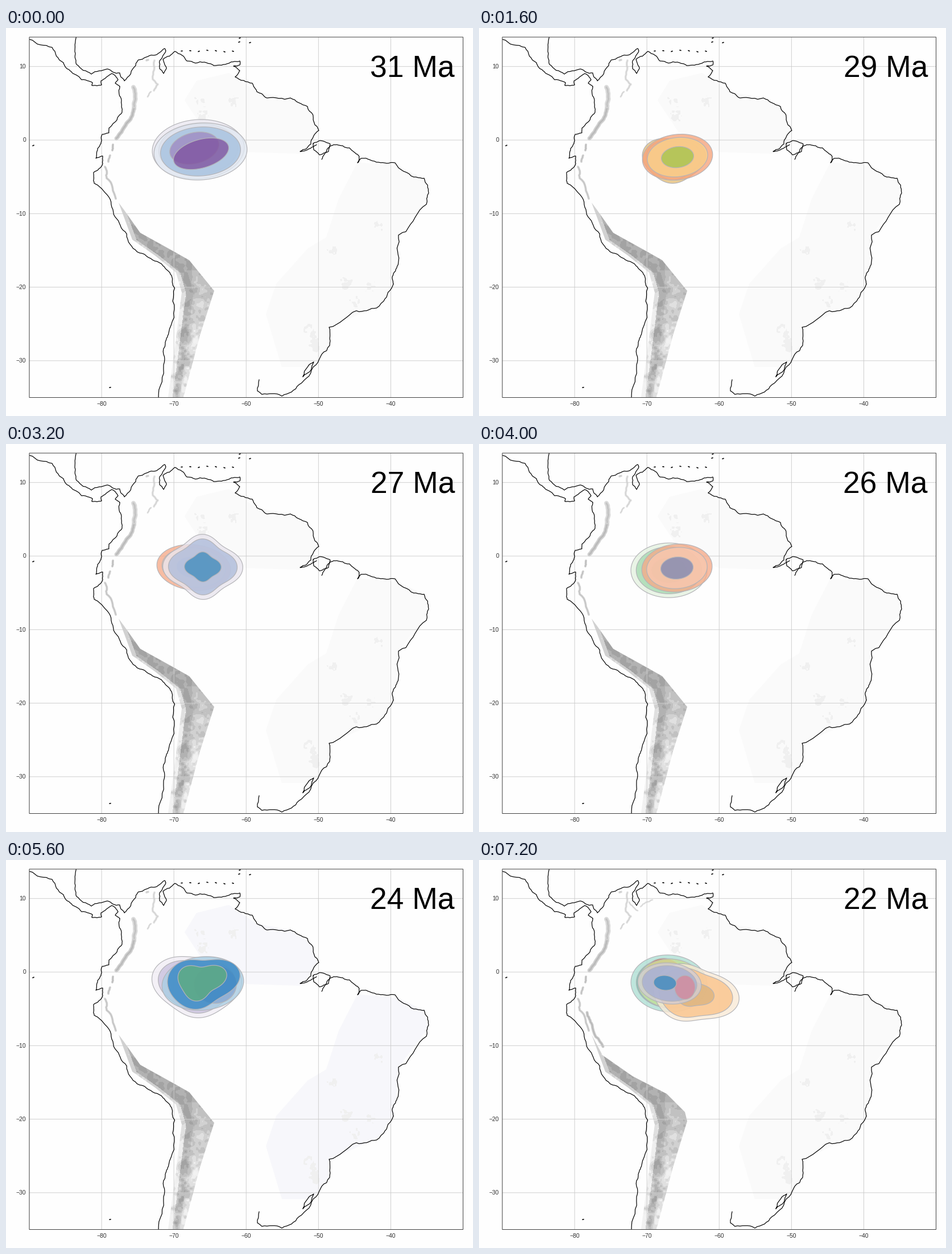
Animation of 821x682 px, one loop 8000 ms. Source, as a matplotlib script:

```python
import numpy as np
import matplotlib.pyplot as plt
from matplotlib.animation import FuncAnimation
from matplotlib.colors import to_rgb
from matplotlib.patches import Polygon, Rectangle

W, H, DPI = 821, 682, 64
PT = 72 / DPI                        # points per pixel
X0, X1, Y0, Y1 = 41, 803.5, 16, 649.5
START_AGE, STEPS = 31, 10

rng = np.random.default_rng(7)
fig = plt.figure(figsize=(W / DPI, H / DPI), dpi=DPI, facecolor="#fefefe")
ax = fig.add_axes([0, 0, 1, 1])
ax.axis("off")
frame = Rectangle((X0, Y0), X1 - X0, Y1 - Y0, fc="none", ec="#404040",
                  lw=PT, zorder=9, snap=False)
ax.add_patch(frame)


# --- helpers -------------------------------------------------------------
def pts(*v):
    return np.array(v, float).reshape(-1, 2)


def lon_x(lon):
    return X0 + (lon + 90) * (X1 - X0) / 60


def lat_y(lat):
    return Y0 + (14 - lat) * (Y1 - Y0) / 49


def rough(p, amount=0.11, rounds=3):
    """Split every segment and push the new points sideways."""
    for _ in range(rounds):
        d = np.diff(p, axis=0)
        side = np.column_stack([-d[:, 1], d[:, 0]])
        mid = p[:-1] + d / 2 + side * rng.uniform(-amount, amount, (len(d), 1))
        out = np.empty((2 * len(p) - 1, 2))
        out[::2], out[1::2] = p, mid
        p = out
    return p


def noise(w, h, cell):
    """Smooth random field between 0 and 1."""
    g = rng.random((h // cell + 3, w // cell + 3))
    x, y = np.arange(w) / cell, np.arange(h)[:, None] / cell
    ix, iy = x.astype(int), y.astype(int)
    fx, fy = x - ix, y - iy
    fx, fy = fx * fx * (3 - 2 * fx), fy * fy * (3 - 2 * fy)
    top = g[iy, ix] * (1 - fx) + g[iy, ix + 1] * fx
    low = g[iy + 1, ix] * (1 - fx) + g[iy + 1, ix + 1] * fx
    return top * (1 - fy) + low * fy


def line(p, width=1.2, color="black", z=5, snap=None):
    ln, = ax.plot(p[:, 0], p[:, 1], color=color, lw=width * PT, zorder=z,
                  solid_capstyle="round", solid_joinstyle="round", snap=snap)
    ln.set_clip_path(frame)
    return ln


def area(p, color, z):
    return ax.add_patch(Polygon(p, fc=color, ec="none", zorder=z))


def picture(img, x, y, clip, z):
    h, w = img.shape[:2]
    im = ax.imshow(img, extent=(x, x + w, y + h, y), interpolation="nearest",
                   aspect="auto", zorder=z)
    im.set_clip_path(clip)
    return im


# --- old shields -----------------------------------------------------------
GUIANA = pts(335, 93, 392, 79, 440, 112, 500, 123, 535, 146, 548, 181, 518, 221,
             422, 218, 350, 182, 314, 127)
BRAZIL = pts(618, 236, 690, 243, 735, 264, 742, 295, 692, 362, 681, 450,
             655, 488, 568, 527, 569, 558, 540, 596, 485, 596, 457, 503,
             475, 450, 530, 388, 563, 368, 585, 300)
HILLS = pts(338, 128, 346, 156, 402, 127, 572, 390, 653, 348, 598, 448,
            612, 482, 640, 455, 532, 530, 545, 558)

shields = [area(p, "#fafafa", 1) for p in (GUIANA, BRAZIL)]
gx, gy = np.meshgrid(np.arange(300, 760), np.arange(70, 610))
near = sum(np.exp(-((gx - x) ** 2 + (gy - y) ** 2) / 260) for x, y in HILLS)
bumps = np.minimum(near, 1) * (noise(460, 540, 11) + noise(460, 540, 4)) / 2
spots = np.full(bumps.shape + (4,), 0.945)
spots[..., 3] = bumps > 0.46
for s in shields:
    picture(spots, 300, 70, s, 2)

# --- mountains ---------------------------------------------------------------
WEST = pts(285, 649, 295, 575, 309, 465, 299, 430, 262, 400, 222, 372, 198, 307)
EAST = pts(207, 319, 236, 360, 290, 390, 322, 408, 366, 462, 341, 540, 312, 649)
EAST_LATE = pts(206, 322, 217, 343, 270, 380, 330, 411, 362, 443, 366, 459,
                341, 540, 312, 649)

w, h = 190, 350
gx, gy = np.meshgrid(np.arange(190, 190 + w), np.arange(302, 302 + h))
inland = gx - np.interp(gy, WEST[::-1, 1], WEST[::-1, 0])
grain = (noise(w, h, 13) + noise(w, h, 5)) / 2 - 0.5
south = np.clip((gy - 400) / 200, 0, 1)
streak = np.exp(-((inland - 14) / 10) ** 2)
tone = 0.69 + 0.18 * south - 0.12 * streak * south + 0.16 * (inland < 7)
tone += 0.05 * (gy > 425) * (inland > 20) + (0.08 + 0.3 * south) * grain
tone = np.clip(np.round(tone / 0.06) * 0.06 - 0.02, 0.62, 0.95)
texture = np.repeat(tone[..., None], 3, axis=2)


def andes(east):
    return picture(texture, 190, 302, area(np.vstack([WEST, east]), "none", 2), 3)


def ridge(width, shade, *v):
    """Pale hill range with a darker crest."""
    p = rough(pts(*v), 0.12)
    return [line(p, width, str(shade), 3),
            line(p, width * 0.4, str(shade - 0.09), 3)]


ridge(8, 0.86, 224, 104, 227, 122, 225, 142)
ridge(7, 0.82, 225, 142, 219, 160, 203, 183, 194, 194)
ridge(4, 0.82, 188, 205, 187, 215)
ridge(4, 0.84, 183, 224, 180, 235)
ridge(4, 0.85, 174, 244, 177, 264, 193, 300)
ridge(4, 0.91, 261, 57, 258, 90, 267, 99, 260, 110)
ridge(3, 0.90, 255, 112, 249, 121)
ridge(4, 0.88, 247, 57, 250, 56)
line(pts(200, 324, 207, 339, 215, 352), 2, "#fefefe", 3)

early = [andes(EAST)]
late = [andes(EAST_LATE),
        *ridge(5, 0.81, 190, 268, 199, 290, 218, 328),
        *ridge(3, 0.91, 264, 74, 279, 89),
        *ridge(3, 0.92, 284, 82, 305, 70)]

# --- graticule and labels ------------------------------------------------------
TICK = dict(family="Liberation Sans", size=10.4 * PT, color="#303030")
for lon in range(-80, -30, 10):
    x = lon_x(lon)
    line(pts(x, Y0, x, Y1), 0.9, "#cbcbcb", 4, snap=False)
    ax.text(x, 660.5, f"\u2212{-lon}", ha="center", va="center", **TICK)
for lat in range(10, -40, -10):
    y = lat_y(lat)
    line(pts(X0, y, X1, y), 0.9, "#cbcbcb", 4, snap=False)
    ax.text(35, y + 0.5, str(lat).replace("-", "\u2212"), ha="right",
            va="center", **TICK)

# --- coasts: key points, roughened ---------------------------------------------
ISTHMUS = pts(41, 20, 81, 34, 101, 61, 104, 68, 118, 80, 133, 91, 152, 96,
              151, 101, 168, 100, 167, 93, 186, 80, 197, 91, 192, 97, 200, 103)
PACIFIC = pts(200, 103, 203, 128, 204, 148, 194, 163, 181, 176, 181, 184,
              169, 187, 167, 203, 161, 212, 158, 229, 170, 225, 170, 238,
              154, 254, 155, 273, 168, 282, 186, 315, 201, 347, 218, 380,
              247, 401, 276, 418, 291, 435, 293, 480, 286, 536, 280, 555,
              277, 592, 268, 651)
CARIBBEAN = pts(124, 14, 122, 45, 124, 64, 150, 81, 178, 72, 200, 79, 208, 93,
                228, 66, 233, 56, 259, 48, 279, 36, 281, 40, 270, 58, 270, 71,
                277, 80, 282, 70, 276, 55, 297, 41, 318, 58, 349, 60, 365, 66,
                392, 62, 411, 58, 411, 65, 400, 67, 411, 75, 403, 86)
GUIANAS = pts(403, 86, 433, 97, 441, 112, 459, 123, 500, 123, 530, 138, 543, 170,
              550, 180, 536, 204, 517, 217, 534, 212, 546, 205)
DELTA = pts(540, 203, 553, 198, 570, 204, 567, 217, 551, 223, 541, 214, 540, 203)
BULGE = pts(555, 231, 560, 222, 571, 207, 592, 207, 613, 219, 621, 226, 618, 237,
            625, 229, 655, 236, 684, 237, 717, 262, 735, 264, 743, 290, 739, 310,
            703, 358, 690, 364, 690, 410, 681, 432, 681, 450)
SOUTH = pts(681, 450, 664, 480, 652, 492, 616, 497, 568, 526, 569, 558, 545, 592,
            515, 627, 485, 647, 450, 644, 442, 638, 445, 618)
LAGOON = pts(522, 613, 530, 596, 541, 587, 537, 600, 522, 613)
for coast in (ISTHMUS, PACIFIC, CARIBBEAN, GUIANAS, DELTA, BULGE, SOUTH, LAGOON):
    line(rough(coast))

antilles = [(x, 41 + rng.uniform(-3, 3)) for x in np.linspace(308, 398, 7)]
for x, y in antilles + [(47, 207), (182, 632), (410, 18), (409, 25), (428, 26)]:
    line(pts(x, y, x + 2, y + rng.uniform(-1, 1)), 1.7)


# --- density contours ----------------------------------------------------------
LEVELS = (1, 0.86, 0.46)
ALPHA = 0.78


def cloud(colors, cx, cy, rx, ry, tilt=0, lobes=0, amp=0, turn=0):
    """Nested lobed ellipses; colours are those seen over white."""
    a = np.linspace(0, 2 * np.pi, 160, endpoint=False)
    tilted = a - np.radians(tilt)
    r = 1 / np.hypot(np.cos(tilted) / rx, np.sin(tilted) / ry)
    r *= 1 + amp * np.cos(lobes * (a - np.radians(turn)))
    ring = np.column_stack([r * np.cos(a), r * np.sin(a)])
    patches = []
    for color, size in zip(colors.split(), LEVELS):
        ink = 1 - (1 - np.array(to_rgb(color))) / ALPHA
        patches.append(ax.add_patch(Polygon(
            ring * size + (cx, cy), fc=(*np.clip(ink, 0, 1), ALPHA),
            ec="#b4b4b8", lw=1.2 * PT, zorder=6)))
    return patches


LILAC = "#f2f0f6 #d5d0e6 #a29bcd"
BLUE = "#eeebf2 #c0cbe3 #6ca6cb"
GREEN = "#eaf5e7 #b9e2c2 #90c9a0"
PEACH = "#f8bda2 #fad5c2 #9aa2c4"
SUN = "#f9b797 #fbdca5 #b8d274"

ages = {
    31: [cloud("#efedf4 #ddd3e4", 338, 213, 81, 52, -4),
         cloud("#e8eef5 #b9cfe6", 342, 217, 82, 50, -4),
         cloud("#b3a4cf", 331, 211, 44, 27, -14),
         cloud("#9b78b4", 343, 221, 50, 25, -16)],
    30: [cloud(GREEN, 338, 226, 70, 56),
         cloud(SUN, 348, 217, 62, 40, 4)],
    29: [cloud("#ebcd96 #f5dfb6", 342, 231, 55, 39, 0, 3, 0.08, 214),
         cloud(SUN, 349, 227, 62, 40, -7)],
    28: [cloud(LILAC, 330, 218, 87, 48),
         cloud(PEACH, 342, 218, 60, 44, 6)],
    27: [cloud(PEACH, 330, 217, 65, 40, 6),
         cloud(BLUE, 346, 216, 64, 52, 4, 4, 0.1)],
    26: [cloud(GREEN, 334, 222, 67, 48),
         cloud(PEACH, 348, 218, 62, 42, -5)],
    25: [cloud(PEACH, 345, 221, 68, 42, 5),
         cloud(GREEN, 338, 228, 61, 51, -8, 3, 0.06, 150),
         cloud("#a9d8d6 #dcdfc0", 354, 228, 54, 41, -18),
         cloud("#b9c1be #aeb1ad #777a77", 344, 224, 46, 37, -12)],
    24: [cloud("#f3f1f7 #d5cfe5", 336, 220, 78, 53, 4, 3, 0.08, 210),
         cloud("#bcd9e9", 346, 217, 72, 47, -6),
         cloud("#a4bbdc", 368, 219, 37, 33),
         cloud("#5f9fd0", 343, 215, 64, 42, -12, 3, 0.1, -20),
         cloud("#84c09a", 341, 213, 42, 29, -14, 3, 0.17, -22)],
    23: [cloud(GREEN, 325, 222, 60, 49),
         cloud("#98d3c8", 345, 211, 60, 40),
         cloud(LILAC, 376, 230, 51, 47, 0, 4, 0.06, 45),
         cloud("#eca07a #f4daa0", 341, 214, 70, 44, 0, 3, 0.09),
         cloud("#b4d06a", 327, 212, 31, 19, 0, 3, 0.09)],
    22: [cloud("#bfe6dd #8fcdbc", 334, 217, 67, 50, 4),
         cloud("#e28a6a", 325, 207, 37, 34),
         cloud("#dcecb4", 337, 217, 58, 43, 4),
         cloud("#faefdf #fcd0a4 #e4c49a", 376, 235, 76, 48, 10, 3, 0.08, 5),
         cloud("#dcd8de #b9c0dc", 335, 217, 56, 36, 6),
         cloud("#dfa3b0", 362, 224, 18, 21),
         cloud("#68a3cb", 327, 216, 20, 13, 5)],
}

title = ax.text(789, 86.5, "", family="Liberation Sans", size=53.4 * PT,
                color="black", ha="right", va="baseline", zorder=10)
ax.set_xlim(0, W)
ax.set_ylim(H, 0)


def update(step):
    now = START_AGE - step
    title.set_text(f"{now} Ma")
    for age, clouds in ages.items():
        for patch in sum(clouds, []):
            patch.set_visible(age == now)
    for shield in shields:
        shield.set_facecolor("#f7f7fb" if now == 24 else "#fafafa")
    for part in early:
        part.set_visible(now > 22)
    for part in late:
        part.set_visible(now <= 22)
    return []


anim = FuncAnimation(fig, update, frames=STEPS, interval=800, repeat=True,
                     repeat_delay=0, init_func=lambda: [], blit=False)
plt.show()
```
